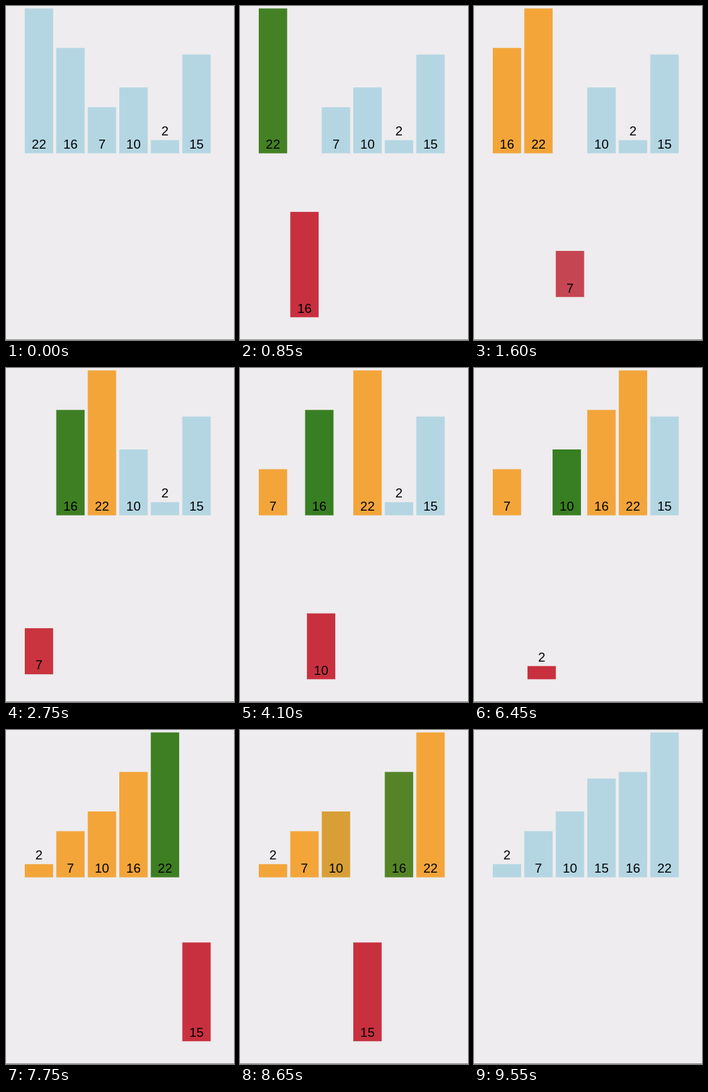
Recreate the animation shown at these times as an HTML page. Size 328 by 480 pixels, loop 9.6 s.

```html
<!DOCTYPE html>
<html lang="en">
<head>
<meta charset="utf-8">
<title>Insertion sort</title>
<style>
  html, body { margin: 0; width: 100%; height: 100%; overflow: hidden; background: #eeecee; }
  svg { display: block; width: 328px; height: 480px; }
  text { font: 18.6px "Liberation Sans", Arial, sans-serif; text-anchor: middle; }
</style>
</head>
<body>
<svg id="stage" viewBox="0 0 328 480">
  <rect y="479" width="328" height="1" fill="#8c8b8c"/>
</svg>
<script>
const VALUES = [22, 16, 7, 10, 2, 15];
const LOOP = 9600, TICK = 50, START = 150, STEP = 255;
const LEFT = 27, PITCH = 45.33, WIDTH = 40.8, BASE = 211.7, UNIT = 9.464, DROP = 235.6;
const BLUE = [180, 214, 226], ORANGE = [243, 165, 58], GREEN = [56, 126, 34], RED = [200, 48, 63];

// Run the sort once, saving every bar's pose after each step.
function record(values) {
  const bars = values.map((value, slot) => ({ value, slot, down: 0, color: BLUE }));
  const order = [...bars];
  const poses = [];
  const save = () => poses.push(bars.map(b => ({ ...b })));

  save();
  order[0].color = ORANGE;
  save();
  for (let i = 1; i < order.length; i++) {
    const key = order[i];
    let j = i, last = null;
    key.down = 1;
    key.color = RED;
    save();
    while (j > 0) {
      const other = order[j - 1];
      if (last) last.color = ORANGE;
      other.color = GREEN;
      last = other;
      save();
      if (other.value <= key.value) break;
      order[j] = other;
      other.slot = j--;
      key.slot = j;
      save();
    }
    order[j] = key;
    key.down = 0;
    key.color = last.color = ORANGE;
    save();
  }
  bars.forEach(b => b.color = BLUE);
  save();
  return poses;
}

function make(tag, parent, attrs) {
  const el = document.createElementNS("http://www.w3.org/2000/svg", tag);
  for (const name in attrs) el.setAttribute(name, attrs[name]);
  return parent.appendChild(el);
}

const stage = document.getElementById("stage");
const groups = VALUES.map(value => {
  const g = make("g", stage, {});
  const height = value * UNIT;
  make("rect", g, { y: BASE - height, width: WIDTH, height });
  const y = height < 25 ? BASE - height - 6.7 : BASE - 6.7;
  make("text", g, { x: WIDTH / 2, y, fill: "#000" }).textContent = value;
  return g;
});

const poses = record(VALUES);
const ease = t => t < 0.5 ? 4 * t ** 3 : 1 - 4 * (1 - t) ** 3;
const mix = (a, b, p) => a + (b - a) * p;

function draw() {
  const time = Math.floor((performance.now() + 10) / TICK) * TICK % LOOP;
  const pos = Math.min(Math.max((time - START) / STEP, 0), poses.length - 1);
  const step = Math.min(Math.floor(pos), poses.length - 2);
  const p = ease(pos - step);
  groups.forEach((g, i) => {
    const a = poses[step][i], b = poses[step + 1][i];
    const x = LEFT + PITCH * mix(a.slot, b.slot, p);
    const y = DROP * mix(a.down, b.down, p);
    g.setAttribute("transform", `translate(${x} ${y})`);
    const rgb = a.color.map((c, k) => Math.round(mix(c, b.color[k], p)));
    g.firstChild.setAttribute("fill", `rgb(${rgb})`);
  });
  requestAnimationFrame(draw);
}
draw();
</script>
</body>
</html>
```
